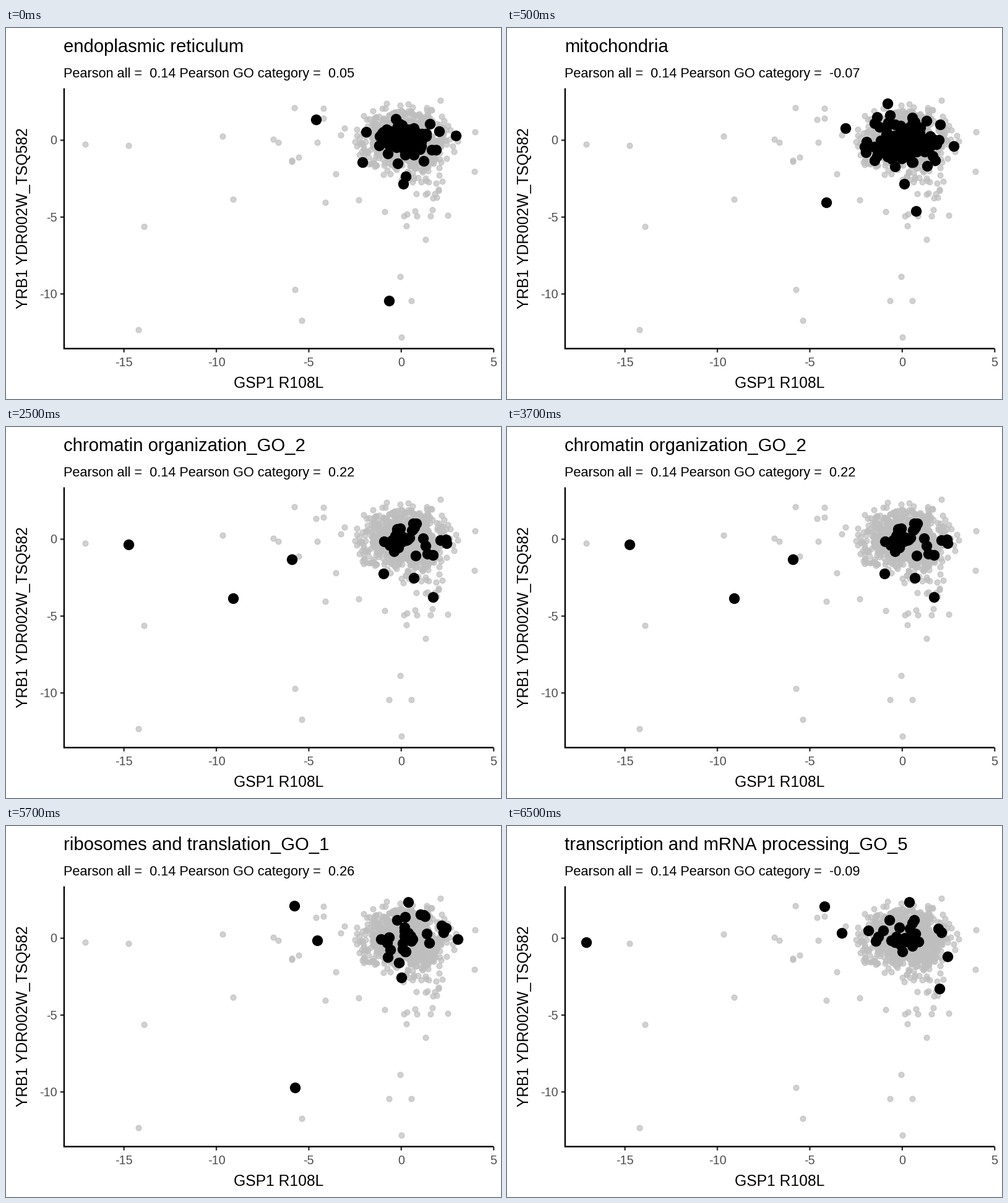
These frames come from a looping animation (800x600 px, 8 s). A matplotlib script:

```python
import numpy as np
import matplotlib.pyplot as plt
from matplotlib.animation import FuncAnimation

W, H, DPI = 800, 600, 160
PX = 72 / DPI                       # points per pixel
LEFT, RIGHT, TOP, BOTTOM = 93.4, 787.5, 97, 518
X0, X_UNIT = 638.3, 29.88           # data to stage pixels
Y0, Y_UNIT = 181, 24.86
CENTER = (643, 180)
STEP_MS, N_STEPS = 500, 16

plt.rcParams.update({
    "font.family": "Liberation Sans",
    "text.kerning_factor": 6,       # practically no kerning
    "axes.unicode_minus": False,
})
rng = np.random.default_rng(21)


def cloud(n, spread, limits):
    """Heavy-tailed cloud around CENTER, cut off at an ellipse."""
    scale = rng.uniform(0.3, 1.6, (n, 1))
    offsets = rng.normal(0, spread, (n, 2)) * scale
    inside = ((offsets / limits) ** 2).sum(axis=1) < 1
    return CENTER + offsets[inside]


# title, correlation within the category, isolated points, clustered points
SCENES = [
    ("endoplasmic reticulum", "0.05",
     [(500, 147), (618, 440), (641, 251), (645, 239), (726, 173), (575, 216)],
     cloud(110, (30, 18), (68, 43))),
    ("mitochondria", "-0.07",
     [(515, 281), (660, 295), (546, 161), (614, 121), (641, 251), (721, 190)],
     cloud(150, (29, 20), (72, 50))),
    ("chromatin organization_GO_2", "0.22",
     [(197, 189), (366, 276), (461, 213), (689, 274), (609, 236), (658, 243)],
     cloud(36, (29, 14), (70, 40))),
    ("ribosomes and translation_GO_1", "0.26",
     [(465, 128), (502, 184), (466, 422), (649, 122), (638, 244), (729, 182)],
     cloud(33, (38, 20), (74, 42))),
    ("transcription and mRNA processing_GO_5", "-0.09",
     [(127, 187), (512, 129), (540, 172), (698, 262), (711, 210), (649, 122)],
     cloud(30, (38, 18), (74, 36))),
]
STARTS_MS = [0, 500, 2500, 4500, 6500]

OUTLIERS = [
    (349, 174), (222, 320), (213, 487), (431, 179), (439, 184), (461, 215),
    (472, 208), (532, 235), (569, 277), (477, 472), (636, 401), (654, 440),
    (638, 499), (677, 341), (646, 319), (611, 296), (512, 145), (757, 167),
    (756, 231), (701, 116),
]

tail = np.column_stack([rng.normal(672, 21, 60),
                        205 + np.minimum(rng.exponential(27, 60), 98)])
marked = [np.vstack([keys, cluster]) for _, _, keys, cluster in SCENES]
background = np.unique(np.vstack(
    [OUTLIERS, cloud(950, (30, 21), (92, 58)), tail, *marked]), axis=0)

fig = plt.figure(figsize=(W / DPI, H / DPI), dpi=DPI, facecolor="white")
ax = fig.add_axes([0, 0, 1, 1])
ax.set(xlim=(-0.5, W - 0.5), ylim=(H - 0.5, -0.5))   # integers = pixel centers
ax.axis("off")


def line(xs, ys, color):
    ax.plot(xs, ys, color=color, lw=2.37 * PX, snap=False,
            solid_capstyle="butt", solid_joinstyle="miter")


def label(x, y, text, size, color="black", **kw):
    return ax.text(x, y, text, size=size, color=color, va="baseline", **kw)


def dots(points, diameter, color):
    return ax.scatter(*points.T, s=diameter ** 2, facecolor=color,
                      edgecolor=color, linewidth=1.57 * PX)


for v in range(-15, 6, 5):
    x = X0 + v * X_UNIT
    line([x, x], [BOTTOM, BOTTOM + 6.1], "#333333")
    label(x, 546.5, str(v), 8.9, "#4d4d4d", ha="center")
for v in (0, -5, -10):
    y = Y0 - v * Y_UNIT
    line([LEFT - 6.1, LEFT], [y, y], "#333333")
    label(82, y + 7, str(v), 8.9, "#4d4d4d", ha="right")
line([LEFT, LEFT, RIGHT], [TOP, BOTTOM, BOTTOM], "black")

label((LEFT + RIGHT) / 2, 581.5, "GSP1 R108L", 11.1, ha="center")
label(34.5, (TOP + BOTTOM) / 2 - 0.5, "YRB1 YDR002W_TSQ582", 11.1,
      ha="center", rotation=90, rotation_mode="anchor")
title = label(92.5, 38.5, "", 13.2)
subtitle = label(92.5, 79.5, "", 9.77)

dots(background, 3.908, (190 / 255,) * 3 + (0.7,))
highlight = dots(marked[0], 7.11, "black")


def update(step):
    scene = np.searchsorted(STARTS_MS, step * STEP_MS, side="right") - 1
    name, r = SCENES[scene][:2]
    title.set_text(name)
    subtitle.set_text(f"Pearson all =  0.14 Pearson GO category =  {r}")
    highlight.set_offsets(marked[scene])
    return title, subtitle, highlight


anim = FuncAnimation(fig, update, frames=N_STEPS, interval=STEP_MS,
                     init_func=lambda: update(0), repeat=True, repeat_delay=0)
plt.show()
```
